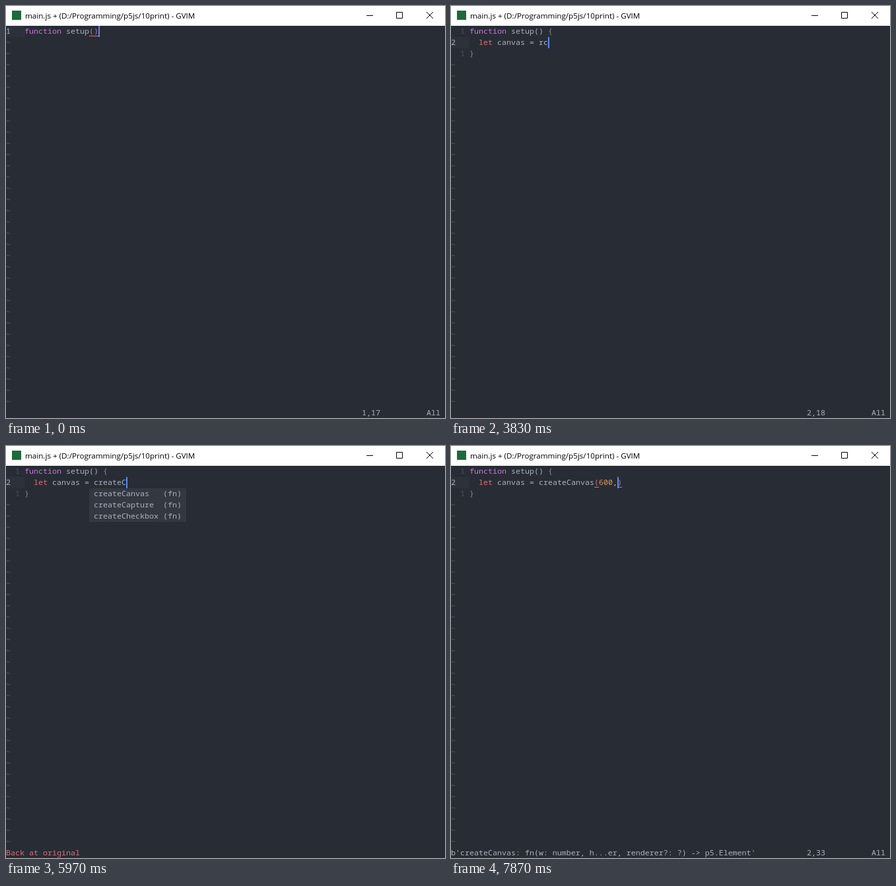
These frames come from a looping animation (665 by 624 pixels, 7990 ms). An HTML page:

```html
<!DOCTYPE html>
<html>
<head>
<meta charset="utf-8">
<style>
  html, body { margin: 0; height: 100%; overflow: hidden; background: #282c34; }
  svg { display: block; width: 665px; height: 624px; }
  text { white-space: pre; }
  #editor { font: 11.667px "Noto Sans Mono", monospace; }
  #title { font: 11.63px "Open Sans", sans-serif; }
</style>
</head>
<body>
<svg viewBox="0 0 665 624">
  <rect width="665" height="30" fill="#fff"/>
  <rect x="9" y="7" width="14" height="14" fill="#1d6b3a"/>
  <text id="title" x="29" y="19">main.js + (D:/Programming/p5js/10print) - GVIM</text>
  <path d="M546 14.5h10M591.5 9.5h9v9h-9zM637 9l10 10M647 9l-10 10" fill="none" stroke="#000"/>
  <g id="editor"></g>
</svg>
<script>
const DURATION = 7990, CELL = 7, LINE = 17, TOP = 30, GUTTER = 4;
const FG = '#abb2bf', RED = '#e06c75', BLUE = '#61afef', DIM = '#4b5263', BAND = '#2c323c';
const KEYWORDS = { function: '#c678dd', let: RED };
const HEAD = 'function setup() {';
const BACK = 'Back at original';
const HINT = "b'createCanvas: fn(w: number, h...er, renderer?: ?) -> p5.Element'";
const COMPLETIONS = ('A Audio Button Canvas Capture Checkbox Div Element FileInput Graphics Image Img Input ' +
  'NumberDict P Radio Select Slider Span StringDict Vector Video Writer').split(' ').map(s => 'create' + s);

// [start time, current line with "|" as cursor, message]
const steps = [
  [0, 'function setup()|'],
  [680, 'function setup() |'],
  [960, HEAD + '|}'],
  [1270, '  |'],
  [2020, '  l|'],
  [2170, '  let|'],
  [2290, '  let |'],
  [2570, '  let ca|'],
  [2700, '  let canv|'],
  [2850, '  let canva|'],
  [3530, '  let canvas|'],
  [3680, '  let canvas = |'],
  [3830, '  let canvas = rc|'],
  [4260, '  let canvas = c|'],
  [4540, '  let canvas = cre|'],
  [5100, '  let canvas = crea|'],
  [5250, '  let canvas = create|', BACK],
  [5970, '  let canvas = createC|', BACK],
  [6370, '  let canvas = createCa|', BACK],
  [6520, '  let canvas = createCan|', BACK],
  [6640, '  let canvas = createCanvas|', 'match 4 of 23'],
  [7070, '  let canvas = createCanvas(|)', HINT],
  [7600, '  let canvas = createCanvas(6|)', HINT],
  [7750, '  let canvas = createCanvas(600|)', HINT],
  [7870, '  let canvas = createCanvas(600,|)', HINT]
];

const editor = document.getElementById('editor');
const rowY = row => TOP + row * LINE;
const rect = (x, y, w, h, fill) => `<rect x="${x}" y="${y}" width="${w}" height="${h}" fill="${fill}"/>`;
const print = (row, col, str, fill = FG, extra = '') =>
  `<text x="${col * CELL}" y="${rowY(row) + 12}" fill="${fill}" ${extra}>${str.replace(/>/g, '&gt;')}</text>`;

function matchedPair(line, cursor) {
  const close = [cursor, cursor - 1].find(i => /[)}]/.test(line[i] || ''));
  return close === undefined ? [] : [line.lastIndexOf(line[close] === ')' ? '(' : '{', close), close];
}

function code(row, line, pair = []) {
  let out = '';
  for (const { 0: token, index } of line.matchAll(/[a-z]+|\d+|\S/gi)) {
    const col = GUTTER + index, matched = pair.includes(index);
    const color = matched ? RED : KEYWORDS[token] ||
      (/\d/.test(token) ? '#d19a66' : /[{}]/.test(token) ? '#828997' : FG);
    out += print(row, col, token, color);
    if (matched) out += rect(col * CELL, rowY(row) + 15, CELL, 1, RED);
  }
  return out;
}

function popup(row, prefix, selected) {
  const items = COMPLETIONS.filter(s => s.startsWith(prefix));
  const width = Math.max(...items.map(s => s.length)) + 1;
  return rect(18 * CELL, rowY(row), (width + 6) * CELL, items.length * LINE, selected ? '#4b5263' : '#333841') +
    items.map((s, i) => print(row + i, 19, s.padEnd(width) + '(fn)')).join('');
}

function render([, marked, message = '']) {
  const cursor = marked.indexOf('|'), line = marked.replace('|', '');
  const inBody = line.startsWith(' '), row = inBody ? 1 : 0;
  const completing = message && message !== HINT, selected = message.startsWith('match');
  let out = rect(0, rowY(row), GUTTER * CELL, LINE, BAND) + print(row, 0, `${row + 1}`);
  if (inBody) out += print(0, 2, '1', DIM) + code(0, HEAD) + print(2, 2, '1', DIM) + code(2, '}');
  for (let r = inBody ? 3 : 1; r < 34; r++) out += print(r, 0, '~', '#5c6370');
  out += code(row, line, matchedPair(line, cursor));
  out += rect((GUTTER + cursor) * CELL, rowY(row), 2, LINE, '#528bff');
  if (completing) out += popup(2, line.slice(15), selected);
  else out += print(34, 77, `${row + 1},${cursor + 1}`) + print(34, 91, 'All');
  out += print(34, 0, message, selected ? BLUE : completing ? RED : FG, selected ? 'font-weight="700"' : '');
  editor.innerHTML = out;
}

let shown;
function tick() {
  const t = performance.now() % DURATION;
  const step = steps.findLast(s => s[0] <= t);
  if (step !== shown) render(shown = step);
  requestAnimationFrame(tick);
}
tick();
</script>
</body>
</html>
```
